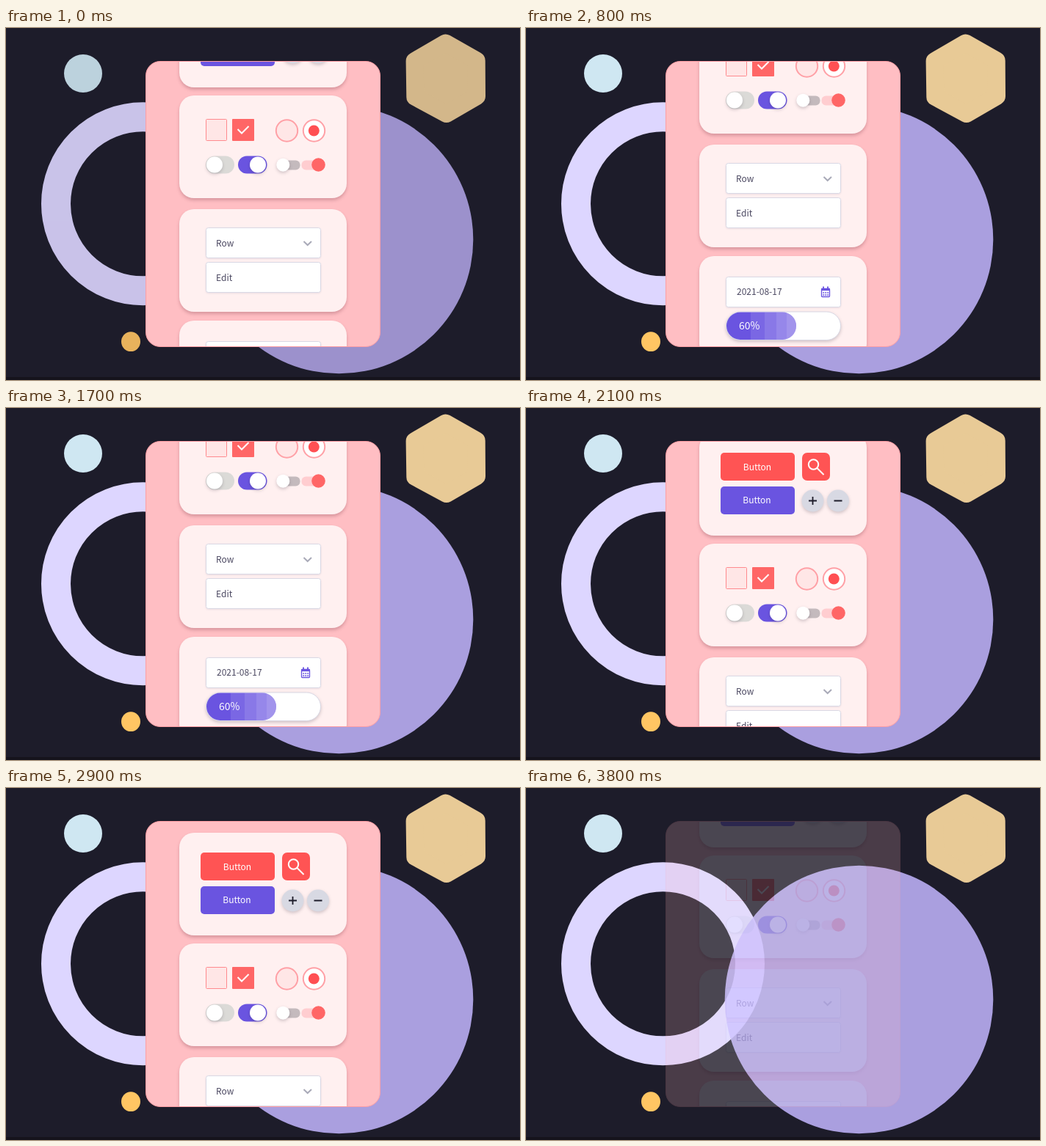
An HTML page without scripts that plays this animation: 700x480 px, repeating every 4 s.

```html
<!DOCTYPE html>
<html lang="en">
<head>
<meta charset="utf-8">
<title>UI kit scroll</title>
<style>
  html, body { margin: 0; width: 100%; height: 100%; overflow: hidden; background: #1d1c2a; }
  svg { display: block; width: 700px; height: 480px; }
  text { font: 12px "Noto Sans CJK SC", "Noto Sans CJK JP", "Noto Sans", sans-serif; fill: #4a4760; }
  .label { font-weight: 500; fill: #fff; }
  .mid { text-anchor: middle; }
  .line { fill: none; stroke: #fff; stroke-width: 2; }
  .card { fill: #fff0f0; filter: drop-shadow(0 3px 2px rgba(80, 20, 30, .22)); }
  .field { fill: #fff; stroke: #d9d8e4; filter: drop-shadow(0 1px 1px rgba(60, 50, 100, .1)); }
  .lift { filter: drop-shadow(0 2px 2px rgba(40, 30, 50, .22)); }
  .red { fill: #ff5454; }
  .coral { fill: #ff6666; }
  .violet { fill: #6a54e0; }
  .white { fill: #fff; }
  .blush { fill: #ffe6e6; }
  .ring { stroke: #ffa0a6; stroke-width: 2; }

  .shapes, .panel, .scroll { animation: 4s step-end infinite; }
  .shapes { animation-name: brighten; }
  .panel { animation-name: dissolve; }
  .scroll { animation-name: scroll; }

  @keyframes brighten {
    0% { opacity: .9; }
    12.5%, 100% { opacity: 1; }
  }
  @keyframes dissolve {
    0% { opacity: 1; }
    95%, 100% { opacity: .2; }
  }
  @keyframes scroll {
    0% { transform: translateY(-59px); }
    /* down to the last card */
    12.5% { transform: translateY(-84px); animation-timing-function: steps(3); }
    20% { transform: translateY(-147px); }
    22.5% { transform: translateY(-170px); }
    25% { transform: translateY(-191px); }
    27.5% { transform: translateY(-197px); }
    30% { transform: translateY(-198px); }
    /* back to the top */
    42.5% { transform: translateY(-146px); animation-timing-function: steps(4); }
    52.5% { transform: translateY(34px); }
    55% { transform: translateY(73px); }
    57.5% { transform: translateY(83px); }
    60% { transform: translateY(86px); }
    /* return to rest */
    72.5% { transform: translateY(61px); animation-timing-function: steps(3); }
    80% { transform: translateY(-41px); }
    82.5%, 100% { transform: translateY(-59px); }
  }
</style>
</head>
<body>
<svg viewBox="0 0 700 480">
  <defs>
    <clipPath id="view"><rect x="191" y="46" width="318" height="388" rx="19"/></clipPath>
    <clipPath id="bar"><rect x="37" y="76.5" width="95" height="37.5" rx="18.7"/></clipPath>
    <rect id="card" class="card" width="228" height="140" rx="20"/>
    <rect id="field" class="field" x="36.5" y=".5" width="156" height="41" rx="3"/>
  </defs>

  <rect width="700" height="480" fill="#1d1c2a"/>
  <rect y="476" width="700" height="4" fill="#15131c"/>

  <g class="shapes">
    <circle cx="105" cy="62" r="26" fill="#cfe7f2"/>
    <circle cx="186.5" cy="239.8" r="118.5" fill="none" stroke="#ddd6ff" stroke-width="40"/>
    <circle cx="453.5" cy="288.5" r="182.8" fill="#c3b7ff" fill-opacity=".85"/>
    <ellipse cx="170" cy="427.7" rx="13" ry="13.4" fill="#ffc563"/>
    <path d="M598.5 20.5 640.7 44.5 641 93 599.7 117 557.3 94 556.6 45Z" fill="#e8ca96"
          stroke="#e8ca96" stroke-width="24" stroke-linejoin="round"/>
  </g>

  <g class="panel">
    <rect x="190.5" y="45.5" width="319" height="389" rx="19.5" fill="#ffbec3" stroke="#ff9fa5"/>
    <g clip-path="url(#view)">
      <g class="scroll">

        <g transform="translate(236)">
          <use href="#card"/>
          <rect class="red" x="29" y="27" width="101" height="38" rx="5"/>
          <text class="label mid" x="79" y="50.5">Button</text>
          <rect class="red" x="140" y="27" width="38" height="38" rx="7"/>
          <circle class="line" cx="155.5" cy="43" r="6.7"/>
          <path class="line" d="M160.5 48 169.500 57"/>
          <rect class="violet" x="29" y="73" width="101" height="38" rx="5"/>
          <text class="label mid" x="78.500" y="96">Button</text>
          <g class="lift" fill="#d8d9e3">
            <circle cx="154.500" cy="92.500" r="15"/>
            <circle cx="189" cy="92.500" r="15"/>
          </g>
          <path d="M149 92.500h11M154.500 87v11M183.500 92.500h11" stroke="#1d1c2a" stroke-width="1.8"/>
        </g>

        <g transform="translate(236 151)">
          <use href="#card"/>
          <rect class="blush" x="36.5" y="32.500" width="28" height="29" rx="1" stroke="#ff8a8e"/>
          <rect class="coral" x="72" y="32" width="30" height="30" rx="1"/>
          <path class="line" d="M79.500 46 85 51.500 94.500 42"/>
          <circle class="blush ring" cx="146.500" cy="48" r="14.700"/>
          <circle class="white ring" cx="183.500" cy="48" r="14.700"/>
          <circle cx="183.300" cy="48" r="7.500" fill="#ff5053"/>
          <rect x="36" y="82.500" width="39" height="24" rx="12" fill="#dbdad7"/>
          <rect class="violet" x="80" y="82.500" width="39.500" height="24" rx="12"/>
          <rect x="138" y="88.500" width="26.500" height="13" rx="6" fill="#c4babd"/>
          <rect x="166.500" y="88.500" width="27" height="13" rx="6" fill="#ffcdd0"/>
          <g class="lift white">
            <circle cx="48" cy="94.500" r="11"/>
            <circle cx="107" cy="94.500" r="11"/>
            <circle cx="141.300" cy="94.700" r="9"/>
          </g>
          <circle class="coral" cx="189.500" cy="94.500" r="9.300"/>
        </g>

        <g transform="translate(236 306)">
          <use href="#card"/>
          <use href="#field" y="25"/>
          <text x="50" y="51">Row</text>
          <path class="line" d="M169.500 44 174.700 49 180 44" style="stroke:#a9aab8"/>
          <use href="#field" y="72"/>
          <text x="50" y="98">Edit</text>
        </g>

        <g transform="translate(236 458)">
          <use href="#card"/>
          <use href="#field" y="28"/>
          <text x="51" y="53">2021-08-17</text>
          <g fill="none" stroke="#6a54e0">
            <rect x="166.500" y="44.500" width="11" height="11" rx="1" stroke-width="1.300"/>
            <path d="M166 45.700h12" stroke-width="3"/>
            <path d="M169 41.500v3M175 41.500v3" stroke-width="1.800"/>
            <path d="M168.200 50h8M168.200 53h8" stroke-width="1.700" stroke-dasharray="2 1"/>
          </g>
          <rect class="field lift" x="36.500" y="76" width="156" height="38.500" rx="19.200"/>
          <g clip-path="url(#bar)">
            <rect class="violet" x="37" y="76" width="95" height="39"/>
            <g fill="#fff" fill-opacity=".11">
              <rect x="70" y="76" width="62" height="39"/>
              <rect x="89" y="76" width="43" height="39"/>
              <rect x="105" y="76" width="27" height="39"/>
              <rect x="119" y="76" width="13" height="39"/>
            </g>
          </g>
          <text class="label" x="54" y="100" style="font-size:14px">60%</text>
        </g>

      </g>
    </g>
  </g>
</svg>
</body>
</html>
```
